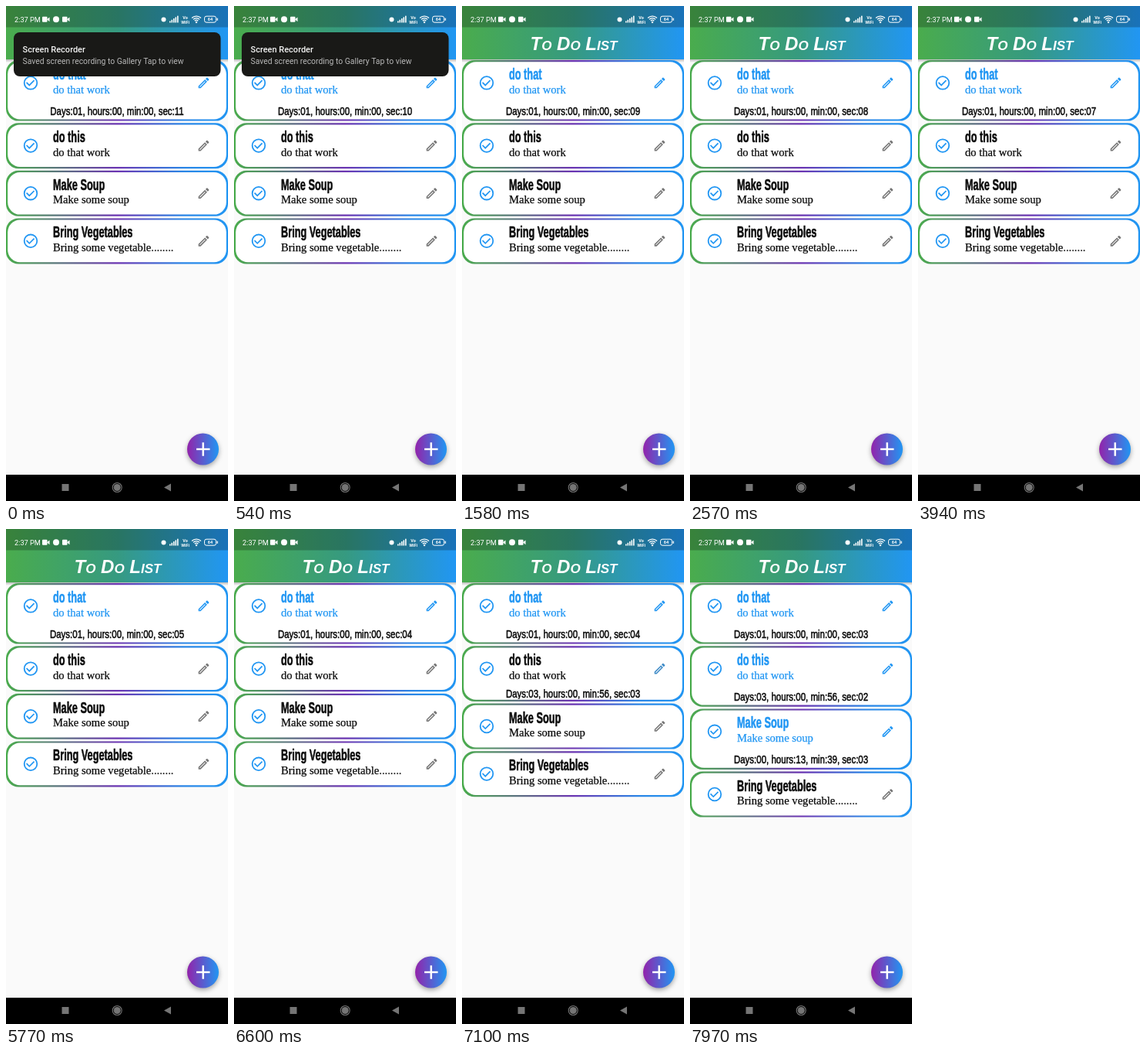
Write an HTML page with a canvas that moves like this. It is 288x640 px and loops after 8 s.

```html
<!DOCTYPE html>
<html lang="en">
<head>
<meta charset="utf-8">
<title>To Do List</title>
<style>
  html, body { margin: 0; width: 100%; height: 100%; overflow: hidden; background: #fafafa; }
  canvas { display: block; width: 288px; height: 640px; }
</style>
</head>
<body>
<canvas id="stage"></canvas>
<script>
const W = 288, H = 640, LOOP = 8000;
const canvas = document.getElementById('stage');
const ctx = canvas.getContext('2d');
const dpr = window.devicePixelRatio || 1;
canvas.width = W * dpr;
canvas.height = H * dpr;

const GREEN = '#4aac4d', BLUE = '#2196f3', INK = '#0c0c0c', DIM = '#757575';

// squeeze gives a condensed face, weight thickens the strokes
const FACES = {
  title: { font: 'bold 20px "Liberation Sans", Arial, sans-serif', squeeze: 0.637, weight: 0.6 },
  note: { font: '14.6px "Liberation Serif", "Times New Roman", serif', squeeze: 1, weight: 0.25 },
  timer: { font: '14px "Liberation Sans", Arial, sans-serif', squeeze: 0.82, weight: 0.55 },
  header: { font: 'italic small-caps bold 24px "Liberation Sans", Arial, sans-serif', squeeze: 1, weight: 0 },
  clock: { font: '9.2px Roboto, sans-serif', squeeze: 1, weight: 0 },
  toastHead: { font: '500 11px Roboto, sans-serif', squeeze: 1, weight: 0 },
  toastBody: { font: '10.4px Roboto, sans-serif', squeeze: 1, weight: 0 },
  tiny: { font: 'bold 5.5px Roboto, sans-serif', squeeze: 1, weight: 0 }
};

const CARDS = [
  { title: 'do that', note: 'do that work', start: -1000, days: '01', hours: '00', min: '00', sec: 11 },
  { title: 'do this', note: 'do that work', start: 6920, days: '03', hours: '00', min: '56', sec: 10 },
  { title: 'Make Soup', note: 'Make some soup', start: 7600, days: '00', hours: '13', min: '39', sec: 11 },
  { title: 'Bring Vegetables', note: 'Bring some vegetable........', start: Infinity }
];
const GROW_MS = 300, GROWTH = 19.6, CARD_H = 59, GAP = 2.6;
const TOAST_LEAVE = 800, TOAST_MS = 300;

const checkIcon = new Path2D('M16.6 7.6 10 14.2 6.4 10.6 5 12l5 5 8-8z');
const pencilIcon = new Path2D('M14.06 9.02l.92.92L5.92 19H5v-.92l9.06-9.06M17.66 3c-.25 0-.51.1-.7.29l-1.83 1.83 3.75 3.75 1.83-1.83c.39-.39.39-1.02 0-1.41l-2.34-2.34c-.2-.2-.45-.29-.71-.29zm-3.6 3.19L3 17.25V21h3.75L17.81 9.94l-3.75-3.75z');

const clamp = v => Math.max(0, Math.min(1, v));
const ease = v => v * v * (3 - 2 * v);
const progress = (t, start, length) => ease(clamp((t - start) / length));

function across(x0, x1, ...stops) {
  const g = ctx.createLinearGradient(x0, 0, x1, 0);
  stops.forEach(([at, color]) => g.addColorStop(at, color));
  return g;
}

function rect(x, y, w, h, color) {
  ctx.fillStyle = color;
  ctx.fillRect(x, y, w, h);
}

function rounded(x, y, w, h, r, color) {
  ctx.beginPath();
  ctx.roundRect(x, y, w, h, r);
  ctx.fillStyle = color;
  ctx.fill();
}

function disc(x, y, r, color) {
  ctx.beginPath();
  ctx.arc(x, y, r, 0, Math.PI * 2);
  ctx.fillStyle = color;
  ctx.fill();
}

function ring(x, y, r, width, color) {
  ctx.beginPath();
  ctx.arc(x, y, r, 0, Math.PI * 2);
  ctx.lineWidth = width;
  ctx.strokeStyle = color;
  ctx.stroke();
}

function polygon(color, ...points) {
  ctx.beginPath();
  points.forEach(([x, y]) => ctx.lineTo(x, y));
  ctx.closePath();
  ctx.fillStyle = color;
  ctx.fill();
}

function text(str, x, y, face, color, align = 'left') {
  const { font, squeeze, weight } = FACES[face];
  ctx.save();
  ctx.translate(x, y);
  ctx.scale(squeeze, 1);
  ctx.font = font;
  ctx.textAlign = align;
  ctx.fillStyle = ctx.strokeStyle = color;
  ctx.fillText(str, 0, 0);
  if (weight) {
    ctx.lineWidth = weight;
    ctx.lineJoin = 'round';
    ctx.strokeText(str, 0, 0);
  }
  ctx.restore();
}

// path drawn on a 24-unit grid around its centre
function icon(path, x, y, scale, color) {
  ctx.save();
  ctx.translate(x, y);
  ctx.scale(scale, scale);
  ctx.translate(-12, -12);
  ctx.fillStyle = color;
  ctx.fill(path, 'evenodd');
  ctx.restore();
}

function camera(x) {
  rounded(x, 13.8, 6.5, 7, 1, '#fff');
  polygon('#fff', [x + 6, 17.3], [x + 9.5, 14.4], [x + 9.5, 20.2]);
}

function drawStatus() {
  text('2:37 PM', 11, 20.7, 'clock', '#fff');
  camera(47);
  disc(65, 17.2, 4, '#fff');
  camera(73);
  disc(204.5, 17.5, 3, '#fff');
  for (let i = 0; i < 5; i++) {
    const h = 2 + i * 1.7;
    rect(212 + i * 2.5, 21.5 - h, 1.6, h, '#fff');
  }
  text('Vo', 232.5, 16.5, 'tiny', '#fff', 'center');
  text('WiFi', 232.5, 22.5, 'tiny', '#fff', 'center');

  ctx.lineWidth = 1.3;
  ctx.strokeStyle = '#fff';
  for (const r of [3.2, 5.8, 8.4]) {
    ctx.beginPath();
    ctx.arc(247, 21.5, r, -Math.PI * 0.75, -Math.PI * 0.25);
    ctx.stroke();
  }
  disc(247, 21, 1.2, '#fff');

  ctx.beginPath();
  ctx.roundRect(257.5, 13.2, 15, 8, 2.5);
  ctx.lineWidth = 1;
  ctx.stroke();
  rect(273.6, 15.6, 1.3, 3.2, '#fff');
  text('64', 265, 19.3, 'tiny', '#fff', 'center');
}

function drawHeader() {
  rect(0, 0, W, 69, across(0, W, [0, GREEN], [0.5, '#369a80'], [1, BLUE]));
  rect(0, 0, W, 27.5, 'rgba(0,0,0,.24)');
  text('To Do List', 145, 57, 'header', '#fff', 'center');
  const shade = ctx.createLinearGradient(0, 69, 0, 73);
  shade.addColorStop(0, 'rgba(0,0,0,.25)');
  shade.addColorStop(1, 'rgba(0,0,0,0)');
  rect(0, 69, W, 4, shade);
}

function drawCard(card, top, open, t) {
  const grown = GROWTH * open;
  const height = CARD_H + grown;
  const edge = across(0, W, [0, GREEN], [0.5, '#6c35b2'], [0.8, '#2a86e6'], [1, BLUE]);
  rounded(0, top, W, height, 16, edge);
  rounded(2.2, top + 2.2, W - 4.4, height - 4.4, 16, '#fff');

  const color = open === 1 ? BLUE : INK;
  const mid = top + 29.4;
  ring(32, mid, 8.3, 1.8, BLUE);
  icon(checkIcon, 32, mid, 0.86, BLUE);
  icon(pencilIcon, 256.5, mid, 0.76, `color-mix(in srgb, ${BLUE} ${open * 100}%, ${DIM})`);
  text(card.title, 61, top + 25, 'title', color);
  text(card.note, 61, top + 42.5, 'note', color);

  if (open > 0) {
    const left = card.sec - Math.floor((t + 650) / 1000);
    const label = `Days:${card.days}, hours:${card.hours}, min:${card.min}, sec:${String(left).padStart(2, '0')}`;
    ctx.save();
    ctx.beginPath();
    ctx.rect(0, top + 55.8, W, grown);
    ctx.clip();
    text(label, 144, top + 60.8 + grown / 2, 'timer', INK, 'center');
    ctx.restore();
  }
}

function drawCards(t) {
  let top = 70;
  for (const card of CARDS) {
    const open = progress(t, card.start, GROW_MS);
    drawCard(card, top, open, t);
    top += CARD_H + GROWTH * open + GAP;
  }
}

function drawAddButton() {
  ctx.save();
  ctx.shadowColor = 'rgba(0,0,0,.35)';
  ctx.shadowBlur = 6 * dpr;
  ctx.shadowOffsetY = 2.5 * dpr;
  disc(255.5, 573, 20.5, across(235, 276, [0, '#9323ab'], [0.5, '#5a5cce'], [1, BLUE]));
  ctx.restore();
  rect(247, 571.8, 17.5, 2.4, '#fff');
  rect(254.5, 564.3, 2.4, 17.5, '#fff');
}

function drawNav() {
  rect(0, 606, W, 34, '#000');
  rect(72.5, 618, 9, 9, DIM);
  ring(144.2, 622.5, 6, 1.1, DIM);
  disc(144.2, 622.5, 4.5, DIM);
  polygon(DIM, [205, 622.5], [214, 617.5], [214, 627.5]);
}

function drawToast(t) {
  const away = progress(t, TOAST_LEAVE, TOAST_MS);
  if (away === 1) return;
  ctx.save();
  ctx.translate(0, -95 * away);
  rounded(10, 34, 268.5, 57, 8, '#191917');
  text('Screen Recorder', 21.5, 59.5, 'toastHead', '#f2f2f2');
  text('Saved screen recording to Gallery Tap to view', 21.5, 74.5, 'toastBody', '#b8b8b8');
  ctx.restore();
}

function draw(t) {
  ctx.setTransform(dpr, 0, 0, dpr, 0, 0);
  rect(0, 0, W, H, '#fafafa');
  drawHeader();
  drawCards(t);
  drawAddButton();
  drawNav();
  drawToast(t);
  drawStatus();
}

const begin = performance.now();
function loop() {
  draw((performance.now() - begin) % LOOP);
  requestAnimationFrame(loop);
}
loop();
</script>
</body>
</html>
```
